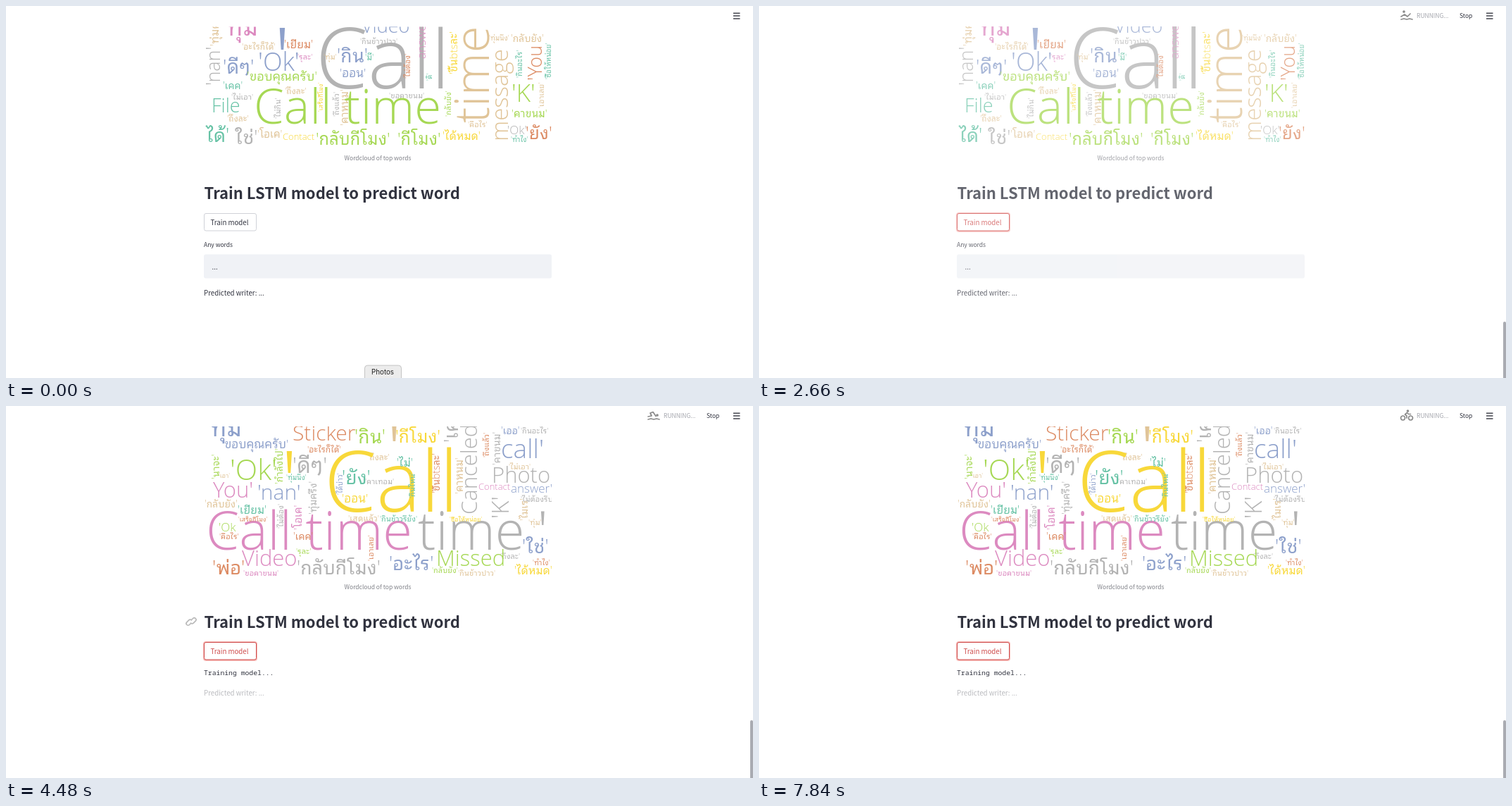
Animation, 1061 px wide and 528 px high, one loop 8000 ms. Source, as an HTML page:

```html
<!DOCTYPE html>
<html lang="en">
<head>
<meta charset="utf-8">
<title>Train model</title>
<style>
  html, body { margin: 0; width: 100%; height: 100%; overflow: hidden; background: #fff; }
  svg { display: block; width: 1061px; height: 528px; }
  text { font-family: "Noto Sans CJK JP", "Noto Sans CJK SC", "Noto Sans", sans-serif; font-size: 9.7px; fill: #31333f; white-space: pre; }
  .cloud text { font-family: "Open Sans", "Noto Sans Thai Looped", "Noto Looped Thai", "Noto Sans Thai", sans-serif; font-weight: 300; fill: inherit; }
  .small { font-size: 8.5px; }
  .icon { fill: none; stroke: #8b8b8b; stroke-width: 1.7; stroke-linecap: round; stroke-linejoin: round; }
</style>
</head>
<body>
<svg viewBox="0 0 1061 528">
  <clipPath id="view"><rect x="281" y="29.5" width="494" height="216"/></clipPath>
  <g id="picture">
    <g clip-path="url(#view)"><g class="cloud" id="before"></g><g class="cloud" id="after"></g></g>
    <text id="caption" class="small" x="528" text-anchor="middle" style="fill:#808289">Wordcloud of top words</text>
  </g>
  <g id="section">
    <text x="281.5" y="274" font-weight="700" style="font-size:22px">Train LSTM model to predict word</text>
    <rect id="ring" x="280" y="293" width="77" height="28" rx="4" fill="#f8b9b6"/>
    <rect id="button" x="281.5" y="294.5" width="74" height="24.5" rx="2.5" fill="#fff"/>
    <text id="label" x="290.5" y="310.5">Train model</text>
  </g>
  <path id="anchor" class="icon" d="M262 309l-1.5 1.5a2.6 2.6 0 0 1-3.7-3.7l3-3a2.6 2.6 0 0 1 3.7 0M264 303l1.5-1.5a2.6 2.6 0 0 1 3.7 3.7l-3 3a2.6 2.6 0 0 1-3.7 0" stroke-width="1.3"/>
  <g id="form">
    <text class="small" x="281" y="342.3">Any words</text>
    <rect x="281" y="352.5" width="494" height="34" rx="2.7" fill="#f0f2f6"/>
    <text x="292.5" y="373.5">...</text>
  </g>
  <text id="training" x="281" y="382.3" style="font:9.75px 'Noto Sans Mono',monospace">Training model...</text>
  <text id="writer" x="281" y="410.5">Predicted writer: ...</text>
  <g id="status">
    <g id="sports" class="icon"></g>
    <text class="small" x="934" y="17" style="fill:#a3a5ac">RUNNING...</text>
    <text class="small" x="995" y="17">Stop</text>
  </g>
  <path d="M1033 10.3h9.5M1033 14.1h9.5M1033 17.9h9.5" stroke="#44464f" stroke-width="1.5"/>
  <rect id="scrollbar" x="1057" width="4" height="84" rx="2" fill="#a9abb1"/>
  <g id="tip">
    <rect x="509.5" y="510" width="52" height="24" rx="4" fill="#ececec" stroke="#c4c4c4"/>
    <text x="535" y="522.5" text-anchor="middle" style="font:9.8px Inter,sans-serif;fill:#222">Photos</text>
  </g>
</svg>
<script>
const $ = id => document.getElementById(id);
const TEAL = '#66c2a5', ORANGE = '#dc8a62', BLUE = '#8da0cb', PINK = '#dc8ac0',
      GREEN = '#a6d854', YELLOW = '#f8d83a', TAN = '#e0c498', GRAY = '#b3b3b3';

// One word per line: left, baseline, size, text. "^" turns the word upwards.
function words(cloud, colour, lines) {
  const texts = lines.trim().split('\n').map(line => {
    const [, up, x, y, size, word] = line.match(/(\^?)(\S+) (\S+) (\S+) (.+)/);
    return `<text transform="translate(${x} ${y})${up && ' rotate(-90)'}" style="font-size:${size}px">${word}</text>`;
  });
  cloud.innerHTML += `<g fill="${colour}">${texts.join('')}</g>`;
}

const before = $('before'), after = $('after');
words(before, GRAY, `
^304 113 27 'nan'
503 54 11 'กินข้าวปาว'
440 117 119 Call
320 133 11 'ไม่เอา'
325 196 27 ใช่'
^390 160 11 'ไม่กิน'
^473 157 11 'ถึงแล้ว'
544 131 11 'ขอคาขนม'
712 182 17 'Ok'`);
words(before, BLUE, `
381 117 119 '
308 96 28 'ดีๆ'
358 92 36 'Ok'
470 80 27 'กิน'
505 38 27 Video
474 101 17 'ออน'`);
words(before, TAN, `
^302 57 16 'ทุ่มครึ่ง'
335 62 12 'อะไรก็ได้'
451 76 11 'ทุ่ม'
396 125 12 'ถึงละ'
314 164 12 'ถึงละ'
357 187 15 'โอเค'
^486 170 15 'คาหนม'
^686 166 69 time
^713 192 33 message
686 49 10 'ทุ่มนึง'
717 51 14 'กลับยัง'
^764 145 11 'เอาเลย'
656 172 11 'คือไร'`);
words(before, PINK, `
313 42 34 ทุ่ม'
414 76 11 'รุละ'
^596 75 17 answer`);
words(before, ORANGE, `
395 60 16 'เยี่ยม'
^574 103 11 'ไม่ต้อง'
^761 106 27 'You
738 189 25 'ยัง'`);
words(before, GREEN, `
342 106 18 'ขอบคุณครับ'
440 197 24 'กลับกี่โมง'
556 197 24 'กี่โมง'
352 167 69 Call time
^632 157 11 'กลับยัง'
718 136 35 'K'
718 158 15 'คาขนม'`);
words(before, YELLOW, `
393 190 13 Contact
620 190 16 'ได้หมด'
^450 150 9 'เสร็จกี่โมง'
^641 97 15 'ขึ้นbtsละ'`);
words(before, TEAL, `
510 77 12 'มี'
308 118 14 'เคค'
292 151 27 File
284 193 27 ได้'
^605 106 10 'ดิ'
^733 102 11 'กินอะไร'
^774 104 10 'ซื้อให้หน่อย'
717 193 10 'ทำไง'`);

words(after, GRAY, `
^642 52 28 'เค
^702 84 14 'คาขนม'
731 39 11 'กินอะไร'
407 95 31 'ดีๆ'
510 111 11 'คาเทอม'
^669 154 31 Canceled
690 109 31 Photo
731 136 11 'ไม่ต้องรีบ'
^714 160 33 'K'
^441 154 14 'ทุ่มครึ่ง'
^394 174 11 'ไม่ต้อง'
585 204 76 time
755 204 76 '
413 239 27 'กลับกี่โมง'
702 217 11 'ถึงละ'`);
words(after, BLUE, `
290 43 34 ทุ่ม'
307 60 17 'ขอบคุณครับ'
703 40 14 'เออ'
703 74 37 call'
^478 126 10 'ได้บ่าว'
717 123 17 answer'
357 133 30 'nan'
733 209 27 'ใช่'
544 233 27 'อะไร'`);
words(after, TAN, `
540 105 119 '
514 77 12 'ถึงละ'
^649 125 15 'คาหนม'
714 90 11 'ไม่เอา'
^741 163 14 'ไมเร'
302 102 9 'เอา'
282 144 14 'กลับยัง'
486 164 12 'เสดแล้ว'
742 169 11 'ทุ่ม'
642 241 11 'กินข้าวปาว'`);
words(after, PINK, `
671 119 13 Contact
294 130 31 You'
^420 176 15 'โอเค'
284 204 76 Call time
335 227 31 Video
337 241 11 'ขอคาขนม'`);
words(after, ORANGE, `
407 49 30 Sticker
^686 73 11 'ถึงแล้ว'
428 66 12 'อะไรก็ได้'
^616 124 14 'ขึ้นbtsละ'
330 164 9 'เสร็จกี่โมง'
303 189 11 'คือไร'
408 190 14 'เคค'
^522 220 11 'เอาเลย'
293 239 27 'พ่อ'
748 226 10 'ทำไง'`);
words(after, GREEN, `
495 53 27 'กิน'
^303 104 14 'นาจะ'
318 105 41 'Ok'
^393 111 14 'กำลังไป'
302 178 17 'Ok
412 210 11 'รุละ'
611 227 31 Missed
605 237 11 'กลับยัง'`);
words(after, YELLOW, `
553 52 25 'กีโมง'
391 150 119 '
452 150 119 Call
477 137 17 'ออน'
630 164 9 'ซื้อให้หน่อย'
722 239 16 'ได้หมด'`);
words(after, TEAL, `
477 111 27 'ยัง'
555 86 16 'ไม่'
^581 131 11 'กินไหน'
398 105 10 'ทุ่มนึง'
329 153 16 'เยี่ยม'
531 164 11 'กินข้าวรึยัง'`);

// Status figures: head position and limbs
const figure = (x, y, limbs) => `<g><circle cx="${x}" cy="${y}" r="1" fill="#8b8b8b"/><path d="${limbs}"/></g>`;
const sports = $('sports');
sports.innerHTML =
  figure(916, 8, 'M912 15l5-3 4 3 4-4M912 19l4-1 4 1 4-1 4 1') +
  figure(921.5, 7, 'M914.5 14a3 3 0 1 0 .1 0M925.5 14a3 3 0 1 0 .1 0M920 17v-3l-2.5-2 3-2.5 2 2h3') +
  figure(921, 7, 'M914 12l2-2.5 4 .3 2 2.7 2.5.5M920 10l-1.3 4 2.3 2.5v4M918.5 15l-1 2-3.5-.7') +
  figure(925, 13, 'M912 15l5-1-2-4 4-1.5 4 6M912 19l4-1 4 1 4-1 4 1') +
  figure(922, 7, 'M920.5 10l-2 4.5 2.5 2 3 4M918 14.5l-3.5 3M920.5 10l-5 1M921 10.5l3 2.5M915 20.5l2-2') +
  figure(920, 9, 'M913 6v4M927 6v4M913 8l5 4v4l-3 5M927 8l-5 4v4l3 5M918 12h4');

const clamp = v => Math.min(1, Math.max(0, v));
const ramp = (t, start, length) => clamp((t - start) / length);
const mix = (a, b, p) => `rgb(${a.map((v, i) => Math.round(v + (b[i] - v) * p))})`;
const show = (id, opacity) => $(id).setAttribute('opacity', Number(opacity));
const RED = [206, 76, 76], INK = [49, 51, 63], EDGE = [208, 210, 216];

function draw(t) {
  const rerun = t >= 4200;
  const shift = rerun ? 41 : 0;
  const stale = 1 - 0.67 * ramp(t, 2100, 1000) ** 1.7;
  const hover = ramp(t, 1260, 210);

  $('tip').setAttribute('transform', `translate(0 ${20 * ramp(t, 0, 210)})`);
  show('before', !rerun);
  show('after', rerun);
  show('picture', t < 4130 ? stale : 1);
  $('caption').setAttribute('y', 219 + shift);

  $('section').setAttribute('transform', `translate(0 ${shift})`);
  show('section', rerun ? 1 : stale);
  show('ring', ramp(t, 1540, 140));
  $('button').setAttribute('stroke', mix(EDGE, RED, hover));
  $('label').style.fill = mix(INK, RED, hover);
  show('anchor', t < 4340 ? 0 : 0.6 * (1 - ramp(t, 4550, 140)));

  show('form', rerun ? 0 : stale);
  show('training', rerun);
  show('writer', stale);

  show('status', t >= 1750);
  const current = Math.floor((t + 1190) / 210) % 6;
  [...sports.children].forEach((el, i) => el.setAttribute('opacity', Number(i === current)));
  show('scrollbar', t >= 1680);
  $('scrollbar').setAttribute('y', rerun ? 446 : 448);
}

const start = performance.now();
function tick() {
  draw((performance.now() - start) % 8000);
  requestAnimationFrame(tick);
}
tick();
</script>
</body>
</html>
```
